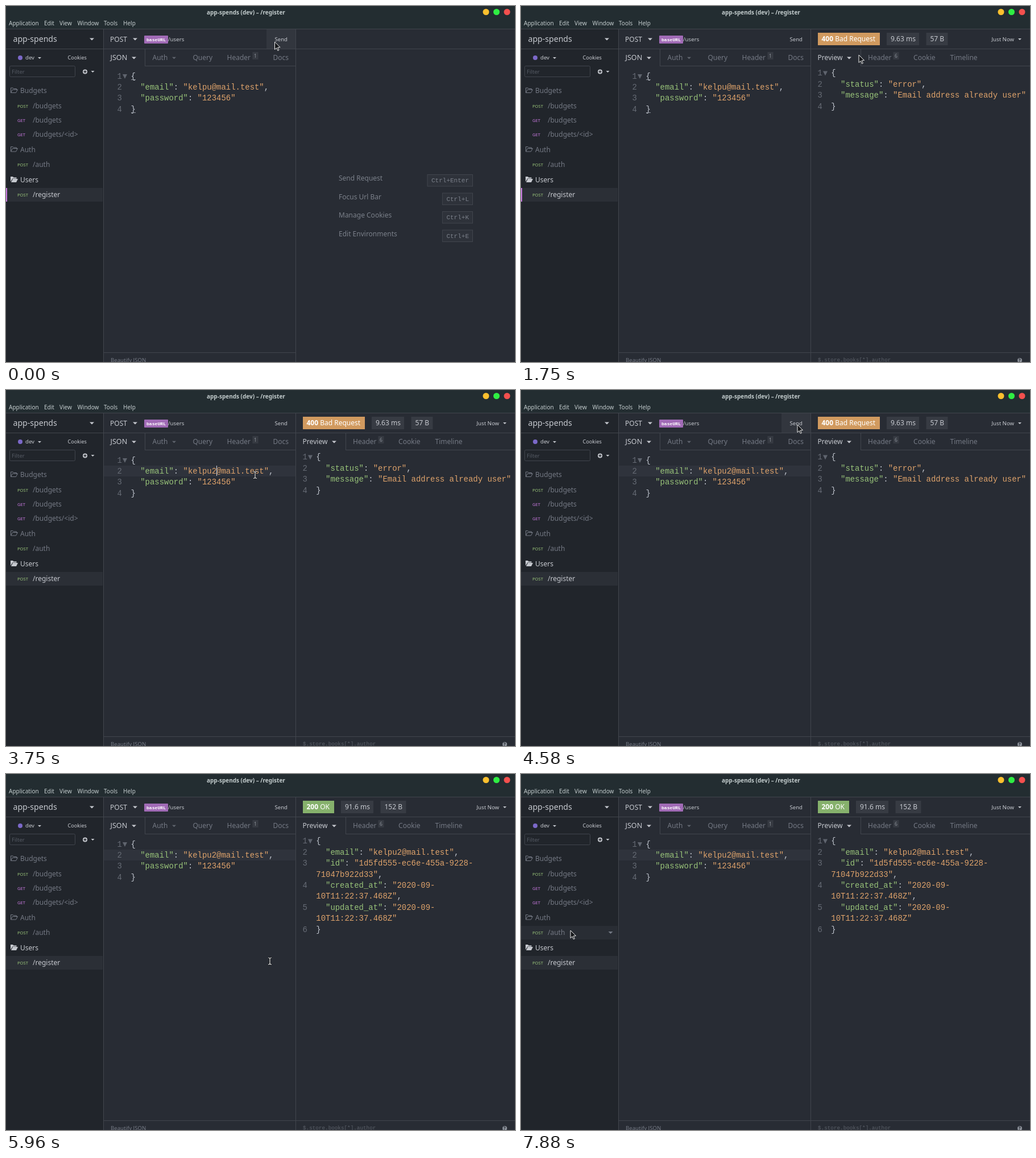
These frames come from a looping animation (895 by 626 pixels, 8 s). An HTML page:

```html
<!DOCTYPE html>
<html lang="en">
<head>
<meta charset="utf-8">
<title>API client</title>
<style>
  html, body { margin: 0; width: 100%; height: 100%; overflow: hidden; background: #282c34; }
  svg { display: block; }
  text { font-family: "Noto Sans", "Open Sans", sans-serif; font-size: 12px; white-space: pre; }
  .mono { font-family: "Liberation Mono", monospace; }
  .code { font-size: 13.94px; }
  .bold { font-weight: 700; }
</style>
</head>
<body>
<svg id="stage" width="895" height="626" viewBox="0 0 895 626"></svg>
<script>
const LOOP = 8000, LINE = 19.4;
const LIGHT = '#c6c9cf', DIM = '#747984', FAINT = '#5f646e', BORDER = '#41454d';
const GREEN = '#98c379', ORANGE = '#dfa36b', PURPLE = '#c678dd';

const escape = s => s.replace(/&/g, '&amp;').replace(/</g, '&lt;');
const text = (x, y, s, fill = LIGHT, size = 12, cls = '') =>
  `<text x="${x}" y="${y}" fill="${fill}" class="${cls}" style="font-size:${size}px">${escape(s)}</text>`;
const rect = (x, y, w, h, fill, extra = '') =>
  `<rect x="${x}" y="${y}" width="${w}" height="${h}" fill="${fill}" ${extra}/>`;
const hline = (x1, x2, y) => rect(x1, y, x2 - x1, 1, BORDER);
const vline = (x, y1, y2) => rect(x, y1, 1, y2 - y1, BORDER);
const circle = (x, y, r, fill) => `<circle cx="${x}" cy="${y}" r="${r}" fill="${fill}"/>`;
const caretDown = (x, y, fill = LIGHT, w = 4) =>
  `<path d="M${x - w} ${y - w / 2}h${2 * w}l${-w} ${w}z" fill="${fill}"/>`;
const foldArrow = (x, y) => `<path d="M${x} ${y}h8l-4 8z" fill="${FAINT}"/>`;
const group = (id, ...parts) => `<g id="${id}">${parts.join('')}</g>`;
const badge = (x, s) => rect(x, 81, 10, 13, '#363a42') + text(x + 2.5, 91, s, '#8b9099', 8.5);

// Lines without a number continue the one above.
const code = (numX, x, y, lines) => lines.map(([num, line], i) => {
  const marked = line.replace(/("\w+")(?=:)|("[^,{}]*|^\w[^,]*)/g, (m, key) =>
    `<tspan fill="${key ? GREEN : ORANGE}">${m}</tspan>`);
  const by = y + i * LINE;
  return `<text class="mono code" x="${numX}" y="${by}" fill="#666b75">${num}</text>` +
    `<text class="mono code" x="${x}" y="${by}" fill="#bfc4cd">${marked}</text>`;
}).join('');

const requestBody = email => code(195.5, 219.5, 127.6, [
  [1, '{'], [2, `  "email": "${email}",`], [3, '  "password": "123456"'], [4, '}']]);

const folder = (y, name, open) => (open
  ? `<path d="M8 ${y + 4}v-9h4l1.500 1.500h5v2h-7zM9 ${y + 5}l3-6h9l-3 6z" fill="${LIGHT}"/>`
  : `<path d="M8.500 ${y + 4}v-8.500h3.500l1.500 1.500h5v2.500M8.500 ${y + 4}l3-5.500h9l-3 5.500z" fill="none" stroke="${DIM}"/>`)
  + text(25, y + 4.500, name, open ? LIGHT : DIM);
const route = (y, method, path, fill = DIM) =>
  text(20, y + 3, method, method === 'GET' ? PURPLE : GREEN, 7.6) + text(47, y + 4.3, path, fill);

const shortcut = (y, label, keys) => {
  const w = keys.length * 6.6 + 14;
  return text(585, y + 4.300, label, '#7b808a') +
    rect(821 - w, y - 6.500, w - .5, 20.500, '#2e323a', `stroke="${BORDER}"`) +
    text(828 - w, y + 7, keys, '#7b808a', 11, 'mono');
};

const responseHead = (color, w, status, reason, chips) =>
  rect(522, 47, w, 22, color) +
  `<text x="528.500" y="62.300" fill="#fff"><tspan class="bold">${status}</tspan> ${reason}</text>` +
  chips.map(([x, cw, s]) => rect(x, 47, cw, 22, '#373b43') + text(x + 7, 62.3, s)).join('');

const titleBar = [
  rect(0, 0, 895, 40, '#232d31'),
  text(353, 15, 'app-spends (dev) – /register', '#c3cccd', 10, 'bold'),
  circle(844, 10.5, 5.5, '#fcc02e'), circle(862.5, 10.5, 5.5, '#2fee43'), circle(881, 10.5, 5.5, '#f5504e'),
  ...[[5, 'Application'], [67, 'Edit'], [94, 'View'], [125.5, 'Window'], [172, 'Tools'], [206, 'Help']]
    .map(([x, s]) => text(x, 33.5, s, '#c3cccd', 10)),
];

const sidebar = [
  rect(0, 40, 171, 586, '#21252b'),
  text(12.5, 62.5, 'app-spends', LIGHT, 14.1), caretDown(151, 58.5),
  circle(25, 91, 4, '#7b68c8'), text(34, 94.3, 'dev', LIGHT, 9.6), caretDown(59, 91.5, LIGHT, 3),
  text(108.5, 94.3, 'Cookies', LIGHT, 9.1),
  rect(6.5, 105.5, 115, 19, 'none', `stroke="${BORDER}" rx="2"`), text(10, 119, 'Filter', '#565b64', 9.6),
  circle(139, 115.5, 4, LIGHT), `<path d="M136.500 115.500h5M139 113v5" stroke="#21252b" stroke-width="1.300"/>`,
  caretDown(152.5, 115.5, LIGHT, 3),
  group('authHover', rect(0, 267, 170, 24, '#292d34'), caretDown(157.5, 279, DIM)),
  rect(0, 320, 170, 24, '#2b2f36'),
  group('focusBar', rect(0, 320, 2, 24, PURPLE)),
  folder(148.5, 'Budgets'),
  route(176, 'POST', '/budgets'), route(201, 'GET', '/budgets'), route(225.5, 'GET', '/budgets/<id>'),
  folder(252, 'Auth'), route(279, 'POST', '/auth'),
  folder(305, 'Users', true), route(332, 'POST', '/register', LIGHT),
];

const requestPane = [
  group('sendHover', rect(458, 41, 51, 34, '#32363e')),
  text(183, 62.5, 'POST'), caretDown(227, 58.5),
  rect(243, 52, 42, 14, '#a16bb6', 'rx="1"'), text(247, 61.8, 'baseURL', '#fff', 8.1, 'mono bold'),
  text(285, 61.5, '/users', LIGHT, 9.7), text(472.5, 61.5, 'Send', LIGHT, 9.6),
  text(183.5, 95.3, 'JSON', LIGHT, 12.6), caretDown(225, 91.5),
  text(257.5, 95.3, 'Auth', DIM), caretDown(295.5, 91.5, FAINT, 3.5),
  text(328.5, 95.3, 'Query', DIM), text(388.5, 95.3, 'Header', DIM), badge(433.5, '1'),
  text(469.5, 95.3, 'Docs', DIM),
  vline(244, 76, 105), hline(244, 509, 105), hline(171, 509, 609),
  text(184, 626, 'Beautify JSON', DIM, 9.6),
  group('activeLine', rect(172, 133, 337, 19, '#2f333c')),
  group('firstEmail', requestBody('kelpu@mail.test')),
  group('secondEmail', requestBody('kelpu2@mail.test')),
  group('bracketMarks', rect(220, 129, 8, 1, '#8d929b'), rect(220, 187, 8, 1, '#8d929b')),
  foldArrow(205, 120),
  group('caret', rect(370, 133, 1, 18, '#d5d8de')),
];

const responsePane = [
  group('help', shortcut(303, 'Send Request', 'Ctrl+Enter'), shortcut(335.5, 'Focus Url Bar', 'Ctrl+L'),
    shortcut(368, 'Manage Cookies', 'Ctrl+K'), shortcut(400.500, 'Edit Environments', 'Ctrl+E')),
  group('frame',
    text(827.5, 61.5, 'Just Now', LIGHT, 9.6), caretDown(877, 58.5, LIGHT, 3),
    text(521.5, 95.3, 'Preview', LIGHT, 12.1), caretDown(577, 91.5),
    text(610, 95.3, 'Header', DIM), badge(654.500, '6'),
    text(690, 95.3, 'Cookie', DIM, 12.1), text(754.5, 95.3, 'Timeline', DIM),
    vline(597, 76, 105), hline(597, 895, 105), hline(509, 895, 609),
    text(522, 625, '$.store.books[*].author', '#5b6069', 9.3, 'mono'),
    circle(877, 623, 4, '#8b9099'), text(874.8, 626, '?', '#282c34', 8, 'bold')),
  group('errorHead', responseHead('#d19a5f', 109, 400, 'Bad Request', [[643, 57, '9.63 ms'], [712.5, 38, '57 B']])),
  group('errorBody', code(521.5, 545.3, 122.3, [
    [1, '{'], [2, '  "status": "error",'], [3, '  "message": "Email address already user"'], [4, '}']])),
  group('okHead', responseHead('#86b16c', 55, 200, 'OK', [[589, 57, '91.6 ms'], [658.5, 45, '152 B']])),
  group('okBody', code(521.5, 545.3, 122.3, [
    [1, '{'], [2, '  "email": "kelpu2@mail.test",'],
    [3, '  "id": "1d5fd555-ec6e-455a-9228-'], ['', '71047b922d33",'],
    [4, '  "created_at": "2020-09-'], ['', '10T11:22:37.468Z",'],
    [5, '  "updated_at": "2020-09-'], ['', '10T11:22:37.468Z"'], [6, '}']])),
  group('fold', foldArrow(531, 114.5)),
];

const pointers = [
  group('arrow', `<path d="M0 0v13.500l3.200-2.800 2.200 4.800 2-.9-2.200-4.700 4.300-.3z" fill="#15171a" stroke="#eee" stroke-linejoin="round"/>`),
  group('beam', ...[['#15171a', 3], ['#e8e8e8', 1.2]].map(([color, w]) =>
    `<path d="M-3-6q2.500 0 3 1.500q.5-1.500 3-1.500M0-4.500v9M-3 6q2.500 0 3-1.500q.5 1.500 3 1.500" fill="none" stroke="${color}" stroke-width="${w}"/>`)),
];

const stage = document.getElementById('stage');
stage.innerHTML = [
  rect(0, 0, 895, 626, '#282c34'), ...titleBar, ...sidebar, ...requestPane, ...responsePane,
  hline(0, 895, 40), hline(0, 895, 75), vline(171, 40, 626), vline(509, 40, 626), ...pointers,
].join('');
const byId = id => document.getElementById(id);

// Spans of time, in ms, in which each part is visible.
const visible = {
  help: [[0, 40]], frame: [[40, LOOP]],
  errorHead: [[40, 4830]], errorBody: [[210, 4830]],
  okHead: [[4830, LOOP]], okBody: [[4960, LOOP]],
  fold: [[580, 4830], [4960, LOOP]],
  sendHover: [[0, 500], [4455, 5130]],
  focusBar: [[0, 3250]], bracketMarks: [[0, 3250]], activeLine: [[3250, LOOP]],
  firstEmail: [[0, 3750]], secondEmail: [[3750, LOOP]],
  caret: [[3250, 4410], [4830, 5400], [6380, 6880], [7380, 7880]],
  authHover: [[7130, LOOP]],
};

// Pointer moves: first step, last step, number of steps, points passed.
const moves = [
  [420, 710, 8, [484, 82], [472, 72]],
  [1750, 1750, 1, [594, 86]],
  [1920, 2670, 8, [698, 125], [600, 184], [420, 175], [330, 150], [365, 146]],
  [3250, 4000, 7, [365, 146], [430, 150], [486, 146]],
  [4080, 4580, 5, [480, 100], [486, 61]],
  [4830, 4960, 2, [482, 84]],
  [5130, 5830, 7, [486, 200], [480, 320]],
  [5960, 5960, 1, [464, 329]],
  [6085, 6210, 2, [630, 288]],
  [6380, 7130, 7, [738, 210], [600, 140], [350, 200], [160, 275]],
  [7250, 7880, 6, [120, 262], [87, 275]],
];

function along(path, k) {
  const pos = k * (path.length - 1);
  const i = Math.min(Math.floor(pos), path.length - 2);
  return path[i].map((v, axis) => v + (path[i + 1][axis] - v) * (pos - i));
}

function pointerAt(t) {
  let point = [472.5, 63];
  for (const [start, end, steps, ...path] of moves) {
    if (t < start) break;
    const k = t >= end ? 1 : (1 + Math.floor((t - start) / (end - start) * (steps - 1))) / steps;
    point = along([point, ...path], k);
  }
  return point;
}

function draw(t) {
  for (const id in visible) {
    const on = visible[id].some(([from, to]) => t >= from && t < to);
    byId(id).style.display = on ? '' : 'none';
  }
  byId('caret').setAttribute('transform', `translate(${t < 3750 ? -8 : 0})`);
  const [x, y] = pointerAt(t);
  const overCode = x > 171 && y > 105;
  for (const [id, on] of [['arrow', !overCode], ['beam', overCode]]) {
    byId(id).style.display = on ? '' : 'none';
    byId(id).setAttribute('transform', `translate(${x} ${y})`);
  }
}

const began = performance.now();
function tick() {
  draw((performance.now() - began) % LOOP);
  requestAnimationFrame(tick);
}
tick();
</script>
</body>
</html>
```
